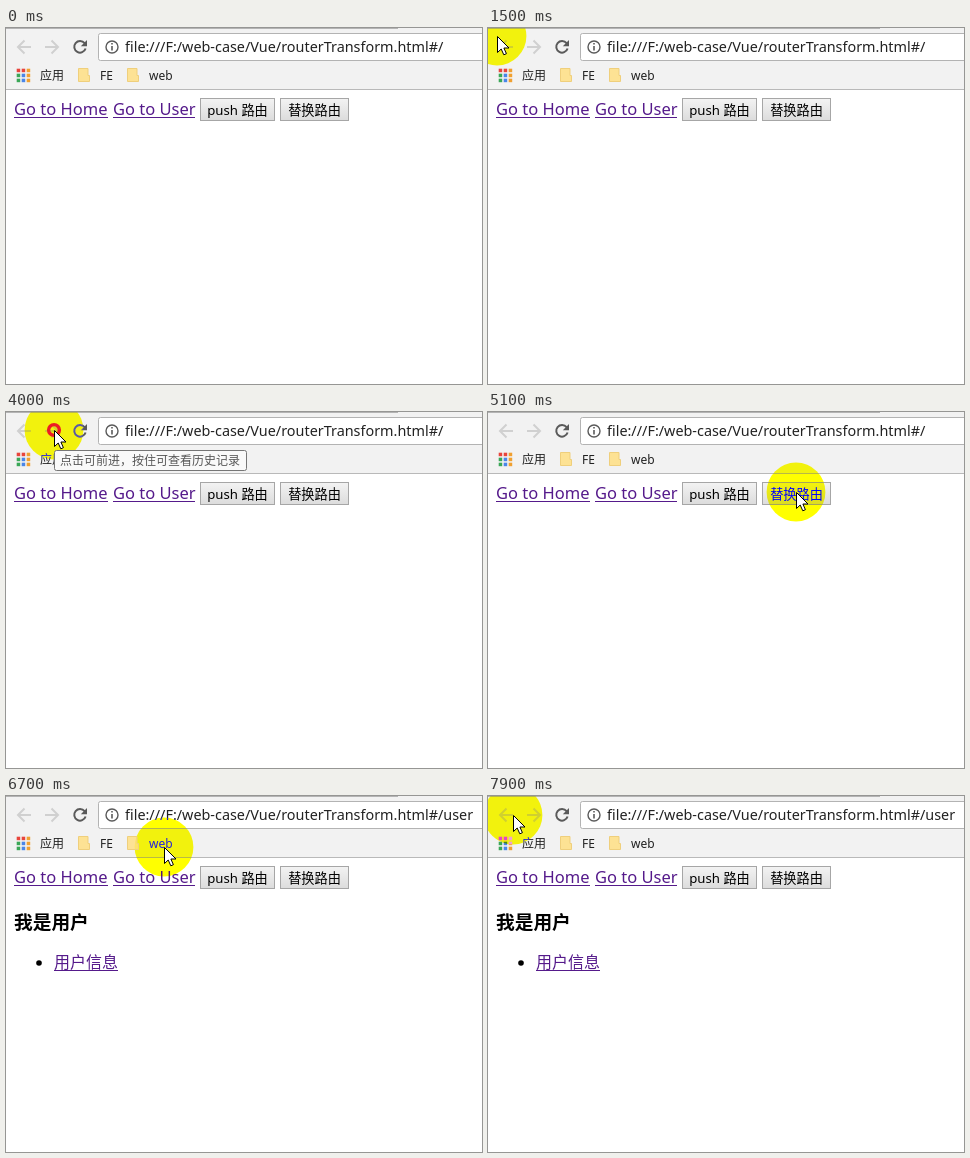
These frames come from a looping animation (476x356 px, 8000 ms). An HTML page:

```html
<!DOCTYPE html>
<html lang="zh-CN">
<head>
<meta charset="utf-8">
<title>Router demo</title>
<style>
  html, body { margin: 0; width: 100%; height: 100%; overflow: hidden; background: #fff; }
  svg { display: block; width: 476px; height: 356px; isolation: isolate;
        font-family: "Noto Sans", "Noto Sans CJK SC", "Noto Sans CJK", sans-serif; }
  text { white-space: pre; }
  .link { fill: #551a8b; }
  .line { stroke: #551a8b; stroke-width: 1; }
  .small { font-size: 12px; fill: #222; }
  .button rect { fill: url(#face); stroke: #a6a6a6; }
  .button text { font-size: 13.2px; text-anchor: middle; }
  .nav { fill: none; stroke: #d0d0d0; stroke-width: 2; }
  #halo { fill: #00f; mix-blend-mode: difference; }
</style>
</head>
<body>
<svg viewBox="0 0 476 356">
  <defs>
    <linearGradient id="face" x2="0" y2="1">
      <stop stop-color="#f3f3f3"/><stop offset="1" stop-color="#dcdcdc"/>
    </linearGradient>
    <path id="folder" d="M.5 .5H10V7.5H11.5V13.5H.5Z" fill="#fde294" stroke="#efcf7c"/>
  </defs>
  <rect width="476" height="356" fill="#fff"/>

  <rect width="476" height="62" fill="#f2f2f2"/>
  <rect width="392" height="1" fill="#b4b4b4"/>
  <rect y="61" width="476" height="1" fill="#b9b9b9"/>
  <path class="nav" d="M25 19H12.5M18.5 12.5L12 19L18.5 25.5"/>
  <path class="nav" d="M39 19H51.5M45.5 12.5L52 19L45.5 25.5"/>
  <path d="M78.6 15.2A5.8 5.8 0 1 0 79.6 20.5" fill="none" stroke="#5a5a5a" stroke-width="2"/>
  <path d="M81 12V18.2H74.8Z" fill="#5a5a5a"/>
  <rect x="92.5" y="5.5" width="400" height="27" rx="2" fill="#fff" stroke="#b3b3b3"/>
  <circle cx="106" cy="19" r="6" fill="none" stroke="#5a5a5a" stroke-width="1.4"/>
  <path d="M106 15V16.6M106 18V22.6" stroke="#5a5a5a" stroke-width="1.6"/>
  <text id="url" x="119" y="24" font-size="14.4" fill="#222"></text>

  <g id="apps"></g>
  <text class="small" x="34" y="52">应用</text>
  <use href="#folder" x="72" y="40"/>
  <text class="small" x="94" y="52">FE</text>
  <use href="#folder" x="121" y="40"/>
  <text class="small" x="143" y="52">web</text>

  <g class="link" font-size="16.5">
    <text x="8" y="87">Go to Home</text>
    <text x="107" y="87">Go to User</text>
  </g>
  <path class="line" d="M8 89.5H102M107 89.5H189"/>
  <g class="button">
    <rect x="194.5" y="70.5" width="74" height="22"/>
    <text x="231.5" y="87">push 路由</text>
    <rect x="274.5" y="70.5" width="68" height="22"/>
    <text x="308.5" y="87">替换路由</text>
  </g>

  <g id="user">
    <text x="8" y="133" font-size="18.72" font-weight="bold">我是用户</text>
    <circle cx="33" cy="167" r="2.8"/>
    <text class="link" x="48" y="172" font-size="16">用户信息</text>
    <path class="line" d="M48 174.5H112"/>
  </g>

  <circle id="halo" r="29.4"/>
  <g id="tip">
    <rect x=".5" y=".5" width="192" height="20" rx="2" fill="#f9f9f9" stroke="#767676"/>
    <text x="6" y="15" font-size="12" fill="#575757"></text>
  </g>
  <g id="pointer">
    <circle id="ring" r="5.4" fill="none" stroke="#ed1c24" stroke-width="3.4"/>
    <path d="M.5 .5V16.5L4.2 13L6.8 18.8L9.4 17.7L6.9 12H12Z" fill="#fff" stroke="#000"/>
  </g>
</svg>
<script>
const LOOP = 8000, STEP = 100;
const $ = id => document.getElementById(id);
const show = (el, on) => { el.style.display = on ? '' : 'none'; };
const URL_TEXT = 'file:///F:/web-case/Vue/routerTransform.html#/';

// time, x, y, slows down on arrival
const track = [
  [100, 382, 151], [200, 401, 151], [800, 401, 151],
  [900, 364, 144], [1000, 235, 97], [1500, 9, 8, true], [1700, 5, 21], [3000, 5, 21],
  [3100, 13, 20], [3200, 13, 20], [3700, 48, 18], [4100, 48, 18],
  [4700, 369, 110, true], [4800, 369, 99], [5100, 308, 80], [5900, 308, 80],
  [6700, 158, 51], [6800, 135, 58], [7700, 59, 33], [7900, 25, 19]
];
const tips = [
  { text: '点击可后退，按住可查看历史记录', x: 5, y: 42, from: 1800, to: 3100 },
  { text: '点击可前进，按住可查看历史记录', x: 48, y: 38, from: 3600, to: 4100 }
];
const clicks = [3100, 4000, 5400];

const dots = ['#e8453c', '#e8453c', '#f0a030', '#3aa757', '#4a86e8', '#f0a030', '#3aa757', '#4a86e8', '#f0a030'];
$('apps').innerHTML = dots.map((color, i) =>
  `<rect x="${10.7 + i % 3 * 5}" y="${40.7 + Math.floor(i / 3) * 5}" width="3.5" height="3.5" fill="${color}"/>`).join('');

function pointerAt(t) {
  const i = track.findIndex(key => key[0] >= t);
  if (i < 0) return track[track.length - 1].slice(1, 3);
  if (i === 0) return track[0].slice(1, 3);
  const [t0, x0, y0] = track[i - 1], [t1, x1, y1, slows] = track[i];
  let k = (t - t0) / (t1 - t0);
  if (slows) k = k * (2 - k);
  return [x0 + (x1 - x0) * k, y0 + (y1 - y0) * k];
}

function render(time) {
  const t = Math.floor(time % LOOP / STEP) * STEP;
  const [x, y] = pointerAt(t).map(Math.round);
  $('halo').setAttribute('transform', `translate(${x} ${y})`);
  $('pointer').setAttribute('transform', `translate(${x} ${y})`);
  show($('halo'), t >= 100);
  show($('pointer'), t >= 100);
  show($('ring'), clicks.some(c => t >= c && t < c + 200));

  const tip = tips.find(p => t >= p.from && t < p.to);
  show($('tip'), tip);
  if (tip) {
    $('tip').setAttribute('transform', `translate(${tip.x} ${tip.y})`);
    $('tip').setAttribute('opacity', Math.min(1, (t - tip.from + STEP) / 500));
    $('tip').querySelector('text').textContent = tip.text;
  }

  $('url').textContent = URL_TEXT + (t >= 5500 ? 'user' : '');
  show($('user'), t >= 6000);
}

const start = performance.now();
function tick() {
  render(performance.now() - start);
  requestAnimationFrame(tick);
}
tick();
</script>
</body>
</html>
```
